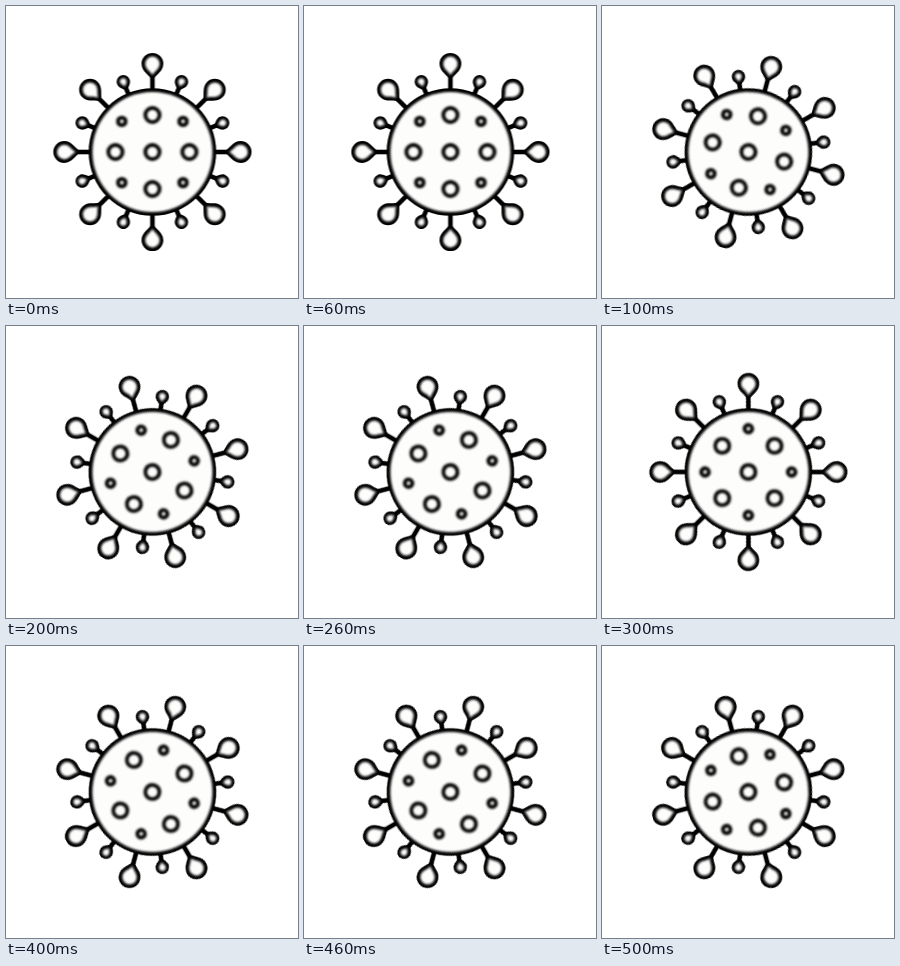
These frames come from a looping animation (292 px wide and 292 px high, 600 ms). An HTML page:

```html
<!DOCTYPE html>
<html lang="en">
<head>
<meta charset="utf-8">
<title>Spinning virus</title>
<style>
  html, body { margin: 0; width: 100%; height: 100%; overflow: hidden; background: #fff; }
  svg { display: block; width: 100vw; height: 100vh; }
  .virus { animation: spin 600ms steps(6) infinite; }
  .soft { fill: #fdfefc; filter: blur(.95px); }
  .stem { stroke: #000; stroke-width: 4.6; }
  .spots { fill: none; stroke: #000; stroke-width: 3.8; filter: blur(.8px); }
  @keyframes spin { to { transform: rotate(90deg); } }
</style>
</head>
<body>
<svg viewBox="0 0 292 292">
  <defs>
    <path id="drop" d="M0 1.6C-.25 1-1 .75-1 0A1 1 0 0 1 1 0C1 .75 .25 1 0 1.6Z"/>

    <!-- hard black silhouette of one long and one short spike -->
    <g id="spikes">
      <path class="stem" d="M0-61V-76"/>
      <use href="#drop" transform="translate(0 -88.2) scale(10.9)"/>
      <g transform="rotate(22.5)">
        <path class="stem" d="M0-61V-70"/>
        <use href="#drop" transform="translate(0 -76) scale(6.7)"/>
      </g>
    </g>

    <!-- soft white cores of the same spikes -->
    <g id="cores">
      <use href="#drop" transform="translate(0 -88.2) scale(7.2)"/>
      <use href="#drop" transform="rotate(22.5) translate(0 -76.2) scale(3.3)"/>
    </g>

    <g id="spots">
      <circle cy="-37" r="7.1"/>
      <circle cy="-43.3" r="3.8" transform="rotate(45)"/>
    </g>

    <g id="spikes2"><use href="#spikes"/><use href="#spikes" transform="rotate(45)"/></g>
    <g id="spikes4"><use href="#spikes2"/><use href="#spikes2" transform="rotate(90)"/></g>
    <g id="cores2"><use href="#cores"/><use href="#cores" transform="rotate(45)"/></g>
    <g id="cores4"><use href="#cores2"/><use href="#cores2" transform="rotate(90)"/></g>
    <g id="spots2"><use href="#spots"/><use href="#spots" transform="rotate(90)"/></g>
  </defs>

  <g transform="translate(146.4 146)">
    <g class="virus">
      <use href="#spikes4"/>
      <use href="#spikes4" transform="rotate(180)"/>
      <circle r="63.8"/>
      <g class="soft">
        <use href="#cores4"/>
        <use href="#cores4" transform="rotate(180)"/>
        <circle r="60"/>
      </g>
      <g class="spots">
        <circle r="7.1"/>
        <use href="#spots2"/>
        <use href="#spots2" transform="rotate(180)"/>
      </g>
    </g>
  </g>
</svg>
</body>
</html>
```
